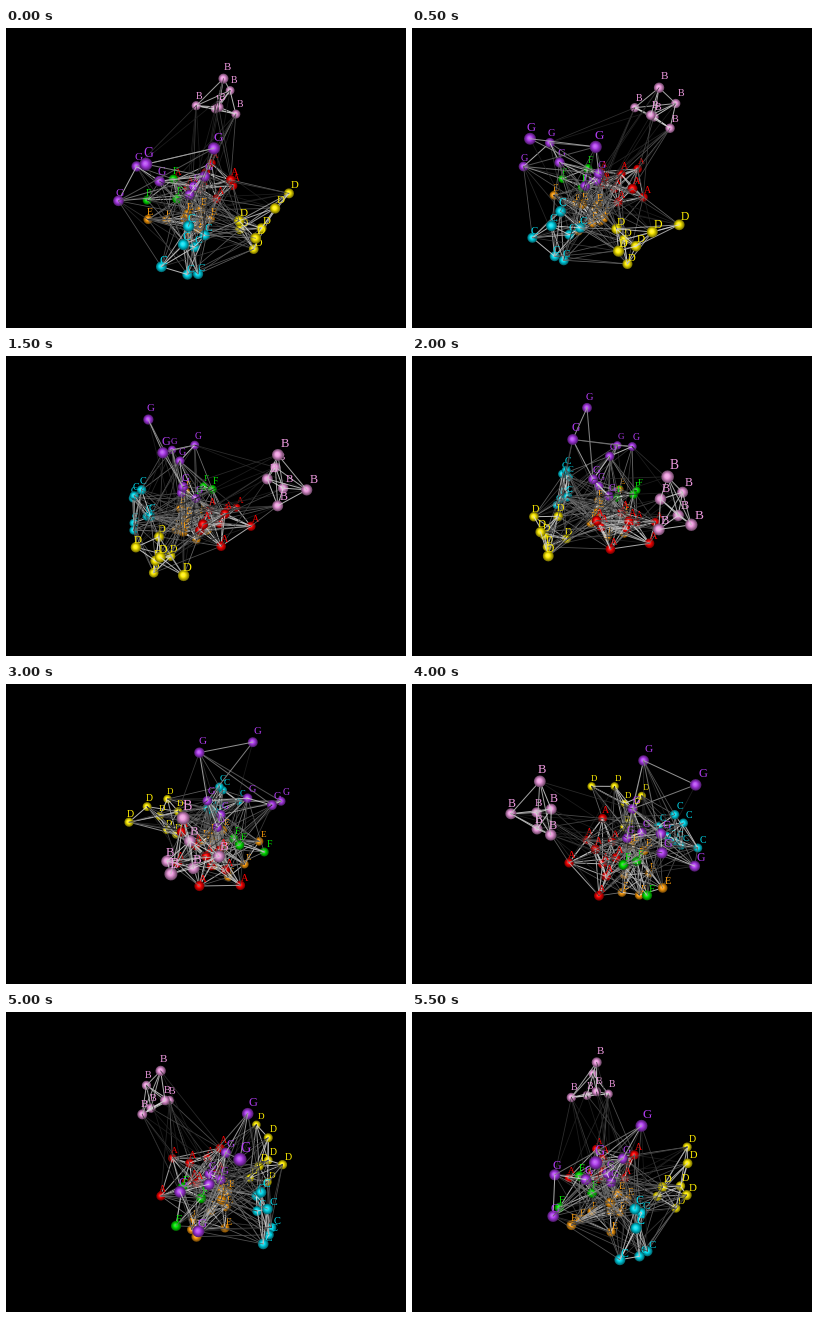
Animation of 400 by 300 pixels, one loop 6 s. Source, as a matplotlib script:

```python
import math
import random

import numpy as np
import matplotlib.pyplot as plt
from matplotlib.animation import FuncAnimation
from matplotlib.collections import LineCollection
from matplotlib.colors import to_rgb

WIDTH, HEIGHT, DPI = 400, 300, 100
PX = 72 / DPI
FRAMES, INTERVAL = 12, 500
CENTER = (200, 145)
FOCAL = 360
TILT = math.sqrt(0.5)  # sine and cosine of a 45 degree camera pitch
PHASE = -math.pi / 3
RADIUS = 4.9
BANDS = np.linspace(-85, 95, 12)  # depth slices that let labels sit between spheres

COLORS = dict(A="#ff0000", B="#ee9adf", C="#00dcf0", D="#ffee00",
              E="#ff9e0c", F="#00e800", G="#b03cf0")

# Right, toward the viewer, up.
GROUPS = {
    "A": [(44, -18, -31), (28, 18, -35), (17, -10, -19), (13, -48, -46), (10, 23, -7),
          (0, 13, -32), (-4, -14, -28), (10, -12, -40), (6, -27, -42)],
    "B": [(60, -15, 71), (52, -42, 35), (54, -16, 41), (67, -27, 27), (71, -4, 26),
          (89, -21, 40)],
    "C": [(-93, 7, -36), (-51, 28, -24), (-61, 23, -34), (-65, 20, 1), (-74, 34, -54),
          (-80, 26, -53), (-76, 21, -12)],
    "D": [(24, 80, -9), (-3, 76, -6), (-35, 72, -17), (-15, 70, -27), (-22, 68, -55),
          (-24, 50, -18), (-14, 48, -45)],
    "E": [(-51, -40, -44), (-29, -34, -65), (-11, -23, -76), (-34, -2, -30), (-21, 6, -32),
          (-29, 8, -54), (-19, 16, -43), (-42, -1, -70), (-14, -2, -72)],
    "F": [(-34, -53, -38), (-25, -20, -26), (-11, -33, -16)],
    "G": [(-71, -12, 65), (-29, 24, 65), (-74, -50, 3), (-43, -50, 21), (-45, -23, 17),
          (-20, 10, 18), (-30, -1, -4), (-15, -5, -8)],
}
LABELS = [name for name, group in GROUPS.items() for _ in group]
POINTS = np.array([p for group in GROUPS.values() for p in group], float)


def make_edges():
    rng = random.Random(7)
    edges = []
    for i in range(len(POINTS)):
        for j in range(i):
            length = np.linalg.norm(POINTS[i] - POINTS[j])
            same = LABELS[i] == LABELS[j]
            if same:
                chance = 0.75 if length < 60 else 0.25
                gray = max(0.35, 1.0 - length / 170)
            else:
                chance = 0.36 * math.exp(-(length / 100) ** 2)
                gray = min(0.75, max(0.13, 0.85 - length / 150))
            if rng.random() < chance:
                edges.append((i, j, (gray, gray, gray, 0.85), 1.0 if same else 0.8))
    return edges


def sphere_layers(name):
    """Nested discs from dark rim to bright core: (size, shift, color)."""
    base = np.array(to_rgb(COLORS[name]))
    layers = []
    for k in np.linspace(0, 1, 7):
        shade = base * (0.5 + 0.5 * min(1, 1.6 * k))
        shade = shade + (1 - shade) * 0.56 * max(0, k - 0.5)
        layers.append((1 - 0.85 * k, 0.12 * k, (*shade, 1)))
    return layers


EDGES = make_edges()
SPHERES = {name: sphere_layers(name) for name in GROUPS}


def spin(angle):
    x, z, h = POINTS.T
    c, s = math.cos(angle), math.sin(angle)
    x, z = x * c - z * s, x * s + z * c
    return x, (z - h) * TILT, (z + h) * TILT


def project(x, y, depth):
    scale = FOCAL / (FOCAL - depth)
    return CENTER[0] + x * scale, CENTER[1] + y * scale, scale


def draw(frame):
    px, py, depth = spin(PHASE + math.tau * frame / FRAMES)
    sx, sy, scale = project(px, py, depth)
    lx, ly, _ = project(px, py, depth + 10)

    # Strokes are (depth, segment, width, color); a sphere disc is a round-capped dot.
    strokes = [((depth[i] + depth[j]) / 2, [(sx[i], sy[i]), (sx[j], sy[j])], width, color)
               for i, j, color, width in EDGES]
    for i, name in enumerate(LABELS):
        radius = RADIUS * scale[i]
        for size, shift, color in SPHERES[name]:
            x, y = sx[i] - shift * radius, sy[i] - shift * radius
            strokes.append((depth[i], [(x, y), (x + 0.02, y + 0.02)],
                            2 * radius * size, color))
        font = 10.5 * scale[i]
        texts[i].set_position((lx[i] + 3.5 * scale[i], ly[i] - 9 * scale[i] + 0.33 * font))
        texts[i].set_fontsize(font * PX)
        texts[i].set_zorder(np.searchsorted(BANDS, depth[i] + 10) + 0.5)

    strokes.sort(key=lambda stroke: stroke[0])
    bands = np.searchsorted(BANDS, [stroke[0] for stroke in strokes])
    for band, layer in enumerate(layers):
        part = [stroke for stroke, b in zip(strokes, bands) if b == band]
        layer.set_segments([stroke[1] for stroke in part])
        layer.set_linewidths([stroke[2] * PX for stroke in part] or [1])
        layer.set_colors([stroke[3] for stroke in part] or ["black"])
    return layers + texts


fig = plt.figure(figsize=(WIDTH / DPI, HEIGHT / DPI), dpi=DPI, facecolor="black")
ax = fig.add_axes([0, 0, 1, 1])
ax.set(xlim=(0, WIDTH), ylim=(HEIGHT, 0))
ax.axis("off")
layers = [ax.add_collection(LineCollection([], capstyle="round", snap=False, zorder=band),
                            autolim=False)
          for band in range(len(BANDS) + 1)]
texts = [ax.text(0, 0, name, color=COLORS[name], family="Liberation Serif",
                 ha="center", va="baseline") for name in LABELS]

anim = FuncAnimation(fig, draw, frames=FRAMES, init_func=lambda: layers + texts,
                     interval=INTERVAL, repeat=True, repeat_delay=0)
plt.show()
```
